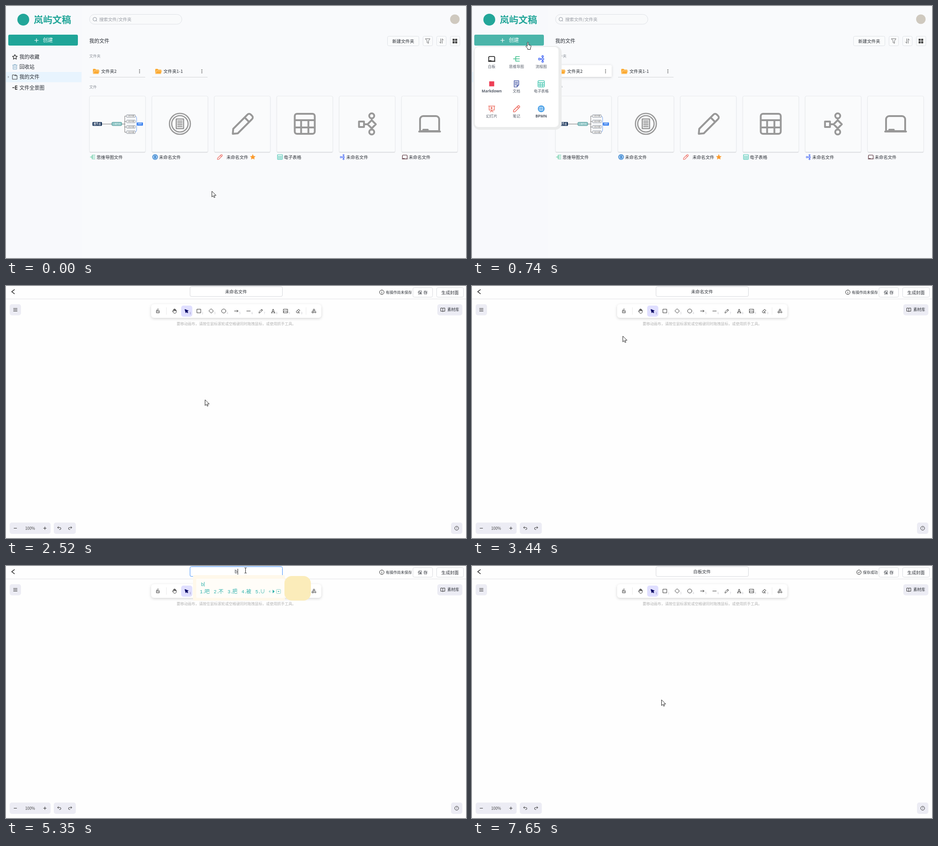
Animation of 1011x554 px, one loop 8000 ms. Source, as an HTML page with a canvas:

```html
<!DOCTYPE html>
<html lang="zh-CN">
<head>
<meta charset="utf-8">
<title>文档工作台</title>
<style>
html, body { margin: 0; width: 100%; height: 100%; overflow: hidden; background: #fff; }
canvas { display: block; width: 100vw; height: 100vh; }
</style>
</head>
<body>
<canvas id="stage" width="1011" height="554"></canvas>
<script>
const ctx = document.getElementById('stage').getContext('2d');
const LOOP = 8000;
const FONT = '"Noto Sans CJK SC", "Noto Sans CJK", "Noto Sans", sans-serif';
const TEAL = '#1fa598', INK = '#2b2f36', GRAY = '#989898', LINE = '#dfe2e7';

// ---------- drawing helpers ----------
function text(s, x, y, size = 9.6, color = INK, align = 'left', weight = 400, font = FONT) {
  ctx.font = `${weight} ${size}px ${font}`;
  ctx.textAlign = align;
  ctx.fillStyle = color;
  ctx.fillText(s, x, y + size * 0.37);
}

function box(x, y, w, h, r, fill, stroke) {
  ctx.beginPath();
  ctx.roundRect(x, y, w, h, r);
  if (fill) { ctx.fillStyle = fill; ctx.fill(); }
  if (stroke) { ctx.strokeStyle = stroke; ctx.lineWidth = 1; ctx.stroke(); }
}

function disc(x, y, r, fill, stroke) {
  ctx.beginPath();
  ctx.arc(x, y, r, 0, 7);
  if (fill) { ctx.fillStyle = fill; ctx.fill(); }
  if (stroke) { ctx.strokeStyle = stroke; ctx.lineWidth = 1; ctx.stroke(); }
}

function shape(d, x, y, scale, stroke, width = 1, fill) {
  const path = new Path2D(d);
  ctx.save();
  ctx.translate(x, y);
  ctx.scale(scale, scale);
  ctx.lineWidth = width / scale;
  ctx.lineCap = ctx.lineJoin = 'round';
  if (fill) { ctx.fillStyle = fill; ctx.fill(path); }
  if (stroke) { ctx.strokeStyle = stroke; ctx.stroke(path); }
  ctx.restore();
}

function shadowed(blur, dy, color, draw) {
  ctx.save();
  ctx.shadowBlur = blur;
  ctx.shadowOffsetY = dy;
  ctx.shadowColor = color;
  draw();
  ctx.restore();
}

// Icons on a 48 unit grid
const ICONS = {
  board: 'M10 7h28a7 7 0 0 1 7 7v26H3V14a7 7 0 0 1 7-7zM1 41h46M10 37h10',
  mind: 'M3 24h16M19 8v32M19 8h26M19 24h26M19 40h26',
  bpmn: 'M47 24a23 23 0 1 1-46 0a23 23 0 1 1 46 0M42 24a18 18 0 1 1-36 0a18 18 0 1 1 36 0' +
        'M16 13.5h16v21H16zM19.5 18h9M19.5 22h9M19.5 26h9M19.5 30h9',
  pencil: 'M3 46l1-11L35 4a5 5 0 0 1 8 0l2 2a5 5 0 0 1 0 8L14 45zM29 10l9 9',
  table: 'M7 2h34a5 5 0 0 1 5 5v34a5 5 0 0 1-5 5H7a5 5 0 0 1-5-5V7a5 5 0 0 1 5-5zM2 16h44M2 32h44M16 16v30M32 16v30',
  flow: 'M6 19h11v12H6zM17 25h8M25 25l9-9 9 9-9 9zM34 16v-4M34 34v3M39.5 6.5a5.5 5.5 0 1 1-11 0a5.5 5.5 0 1 1 11 0' +
        'M39.5 42a5.5 5.5 0 1 1-11 0a5.5 5.5 0 1 1 11 0',
  doc: 'M8 2h32v30L28 46H8zM40 32H28v14M15 13h18M15 22h18M15 31h8',
  slides: 'M2 5h44M6 5v28h36V5M24 33v6M14 46l10-8 10 8M20 13v12l9-6z'
};

function icon(name, cx, cy, size, color, width) {
  shape(ICONS[name], cx - size / 2, cy - size / 2, size / 48, color, width);
}

// ---------- pointer ----------
const TRACK = [
  [0, 452, 407], [100, 452, 407], [740, 122, 79], [1110, 122, 79], [1380, 42, 124],
  [2040, 42, 124], [2680, 463, 258], [2800, 463, 258], [2900, 463, 303], [3140, 463, 303],
  [3440, 331, 110], [3620, 300, 82], [3920, 368, 117], [3950, 368, 117], [4550, 526, 10],
  [7360, 526, 10], [7650, 416, 294], [LOOP, 416, 294]
];

function pointerAt(t) {
  const i = TRACK.findIndex(k => k[0] > t);
  const [t0, x0, y0] = TRACK[i - 1], [t1, x1, y1] = TRACK[i];
  const u = (t - t0) / (t1 - t0), e = u * (2 - u);
  return { x: x0 + (x1 - x0) * e, y: y0 + (y1 - y0) * e };
}

const inside = (p, x, y, w, h) => p.x >= x && p.x <= x + w && p.y >= y && p.y <= y + h;

const POINTERS = {
  arrow: ['M0 0V12.3l2.9-2.7 1.9 4.2 2-.9L5 8.8h3.8z', 0, 0],
  hand: ['M4 8.5V1.3a1.3 1.3 0 0 1 2.6 0V6l4.6 1.2c1 .3 1.2 1 1 2L11 13.5V16H4.8V14L1 9.6c-.6-1 .6-2 1.5-1.3z', -5, 0],
  beam: ['M-2 -6.5h1.5l.5.5.5-.5H2M0-6v10.5M-2 5h1.5l.5-.5.5.5H2', 0, 0]
};

function drawPointer(kind, p) {
  const [d, dx, dy] = POINTERS[kind];
  shape(d, Math.round(p.x + dx) + 0.5, Math.round(p.y + dy) + 0.5, 1, '#222', 1, kind !== 'beam' && '#fff');
}

// ---------- file list page ----------
const FILES = [
  ['mind', '思维导图文件', '#3fc08d'],
  ['bpmn', '未命名文件', '#4f94d8'],
  ['pencil', '未命名文件', '#ee6a5f'],
  ['table', '电子表格', '#4fc9b5'],
  ['flow', '未命名文件', '#4c6ef5'],
  ['board', '未命名文件', '#4a2028']
];
const NEW_FILE = ['board', '未命名文件', '#4a2028'];
const MENU = [
  ['board', '白板', '#111'], ['mind', '思维导图', '#3fc08d'], ['flow', '流程图', '#4c6ef5'],
  [null, 'Markdown', '#ee3f56'], ['doc', '文档', '#5b6bb0'], ['table', '电子表格', '#4fc9b5'],
  ['slides', '幻灯片', '#ee7a6e'], ['pencil', '笔记', '#ee6a5f'], ['bpmn', 'BPMN', '#4fa3e8']
];

function mindThumb(x) {
  shape('M28 61.5h21M72 61.5h6M82 44h-4v35.5h4M78 56h4M78 68h4', x, 198, 1, '#555', 0.8);
  shape('M101 44q3 0 3 5v25q0 5-3 5M104 61.5h2', x, 198, 1, '#4a86e8', 0.8);
  box(x + 7, 255, 21, 8.5, 1.5, '#1f3a5f');
  text('根节点', x + 17.5, 259.3, 5.4, '#fff', 'center', 700);
  box(x + 49.5, 255.5, 22, 7.5, 2, '#8fc7c7', '#5a9a9c');
  text('二级节点', x + 60.5, 259.3, 4, '#fff', 'center');
  for (let i = 0; i < 4; i++) {
    const y = 242 + i * 11.8;
    box(x + 82, y - 3, 19, 6, 1, '#fff', '#8d949e');
    text('分支主题', x + 91.5, y, 3.7, '#444', 'center');
  }
  box(x + 105, 256, 13, 7, 1, '#3b82f0');
  text('概要', x + 111.5, 259.5, 4, '#fff', 'center');
}

function fileCard([name, label, color], i, hot) {
  const x = 183.5 + 137.2 * (i % 6), y = 198 + 157.5 * Math.floor(i / 6);
  const pencil = name === 'pencil';
  shadowed(hot ? 8 : 2, hot ? 2 : 1, hot ? 'rgba(0,0,0,.16)' : 'rgba(0,0,0,.14)',
    () => box(x, y, 123, 123, 3, hot ? '#fff' : '#fafbfc'));
  box(x, y, 123, 123, 3, null, '#e9ebee');
  ctx.fillStyle = '#d3d5d8';
  ctx.fillRect(x + 1, y + 123, 121, 1);
  if (name === 'mind') mindThumb(x - 0.5);
  else icon(name, x + 61.5, y + 61, 48, GRAY, name === 'bpmn' ? 2.6 : 4);
  const off = pencil ? 11 : 0;
  icon(name, x + 7 + off * 0.45, y + 134, 12, color, 1.1);
  text(label, x + 15.5 + off, y + 134);
  if (pencil) {
    shape('M0-5.5L1.7-1.8 5.6-1.5 2.7 1.2 3.5 5 0 3-3.5 5-2.7 1.2-5.6-1.5-1.7-1.8z',
      x + 84.5, y + 134, 1, '#fb9a2c', 0.6, '#fb9a2c');
  }
}

function folder(x, label, hot) {
  if (hot) shadowed(6, 1, 'rgba(0,0,0,.14)', () => box(x, 130, 124, 26.5, 3, '#fff'));
  ctx.fillStyle = '#d3d5d8';
  ctx.fillRect(x + 1, 156, 122, 1);
  shape('M0 11V1.5Q0 0 1.5 0h4l1.5 1.8h5.5q1.5 0 1.5 1.5V4h1.5L13 11.5H.5z', x + 8, 138.3, 0.97, null, 1, '#fba930');
  shape('M3.2 4.3h11.5L12.7 11H1z', x + 8, 138.3, 0.97, '#fff', 0.6);
  text(label, x + 26, 143.5);
  for (let i = -1; i < 2; i++) disc(x + 110.5, 143.5 + i * 3.3, 0.95, '#444');
}

function sidebar() {
  ctx.fillStyle = '#f8f9fc';
  ctx.fillRect(0, 0, 167, 554);
  disc(38, 30, 13, '#22a699');
  text('岚屿文稿', 61, 30, 20.5, '#22a699', 'left', 700);
  ctx.fillStyle = '#e8f4fe';
  ctx.fillRect(0, 145, 166, 22.5);
  shape('M0-2.5L3 0 0 2.5z', 4, 156, 1, null, 1, '#a9adb4');
  shape('M0-5.3L1.6-1.8 5.3-1.4 2.6 1.2 3.3 5 0 3.1-3.3 5-2.6 1.2-5.3-1.4-1.6-1.8z', 19.5, 112, 1, '#222', 1.2);
  shape('M-5-3.7H5M-2-5.2h4M-4-3.7V5.3h8V-3.7M-1.5-1.5v4.5M1.5-1.5v4.5', 19.5, 133.7, 1, '#7fa9c4', 1);
  shape('M-5-4.5h3.5L0-2.8h4.8V5H-5zM0-2.8V-4.5h2.5L4.8-2.5', 19.5, 156, 1, '#333', 1);
  shape('M-5 0h3.5M1 0h4M1-3.7h4M1 3.7h4M1-3.7v7.4', 19.5, 179.5, 1, '#222', 1.4);
  ['我的收藏', '回收站', '我的文件', '文件全景图'].forEach((s, i) =>
    text(s, 29.5, [112, 134, 156, 179.5][i], 11));
}

function topBar() {
  box(183.5, 18.5, 203, 21.5, 11, '#f9fafb', LINE);
  disc(195.2, 29, 4, null, '#8d949e');
  shape('M0 0l1.5 1.5', 198, 32, 1, '#8d949e');
  text('搜索文件/文件夹', 205, 29, 9.6, '#979ba3');
  disc(986.5, 29, 10.5, '#cfc9bf');
  text('我的文件', 183, 77, 11);
  box(838.5, 66.5, 69, 21, 3, '#fafbfc', LINE);
  text('新建文件夹', 873, 77, 9.6, INK, 'center');
  for (const x of [916.5, 946.5, 976.5]) box(x, 66.5, 21, 21, 3, '#fafbfc', LINE);
  shape('M-5-5H5L1.6-.3V5l-3.2-1.6V-.3z', 927, 77, 1, '#555', 0.9);
  shape('M-1.5-5V5L-4.5 2M1.8 5V-5L4.5-2', 957, 77, 1, '#555', 0.9);
  for (let i = 0; i < 4; i++) box(981.5 + (i % 2) * 5.6, 72 + (i >> 1) * 5.6, 4.6, 4.6, 0.8, '#444');
  text('文件夹', 183, 110, 8.3, '#8f949c');
  text('文件', 183, 177.5, 8.3, '#8f949c');
}

function createMenu(alpha, hot) {
  ctx.globalAlpha = alpha;
  box(3, 88, 194, 184, 14, '#ebecec');
  box(6, 90, 184, 176, 8, '#fff');
  if (hot) box(19.5, 100.5, 48, 44, 4, '#f2f5fb');
  MENU.forEach(([name, label, color], i) => {
    const x = 43.3 + (i % 3) * 54.4, y = 116.3 + Math.floor(i / 3) * 54.8;
    if (name === 'bpmn') {
      disc(x, y, 7.5, color);
      shape('M-3.5-3.5h7v7h-7zM-1.5-3.5v7M1.5-3.5v7', x, y, 1, '#fff', 0.8);
    } else if (name) icon(name, x, y, 15, color, 1.6);
    else box(x - 5.5, y - 5.5, 11, 11, 0, color);
    text(label, x, y + 16.3, 8.2, '#555c68', 'center', /[A-Z]/.test(label) ? 700 : 500,
      /[A-Z]/.test(label) ? '"Noto Sans", sans-serif' : FONT);
  });
  ctx.globalAlpha = 1;
}

function homePage(t, p) {
  ctx.fillStyle = '#f9fafc';
  ctx.fillRect(0, 0, 1011, 554);
  sidebar();
  topBar();
  const onButton = inside(p, 5, 63, 153, 24);
  const menu = Math.min(1, Math.max(0, (t - 610) / 100));
  const onItem = menu === 1 && inside(p, 20, 101, 48, 44);
  const onFolder = inside(p, 183, 130, 124, 27);
  const files = t < 1720 ? FILES : [NEW_FILE, ...FILES];
  let onCard = false;

  folder(183, '文件夹2', onFolder || (t > 560 && t < 1380));
  folder(320, '文件夹1-1');
  files.forEach((f, i) => {
    const hot = i < 6 && inside(p, 183 + 137.2 * i, 198, 124, 124);
    onCard = onCard || hot;
    fileCard(f, i, hot);
  });
  box(5, 63, 153, 24, 3, onButton ? '#4bb5aa' : TEAL);
  shape('M-4 0H4M0-4V4', 67, 75.5, 1, '#fff', 1.2);
  text('创建', 81, 75.3, 11, '#fff');
  if (menu) createMenu(menu, onItem);
  drawPointer(onButton || onItem || onFolder || onCard ? 'hand' : 'arrow', p);
}

// ---------- whiteboard page ----------
const TOOLS = [
  [334, 'M-3-.5h6v4.5h-6zM-2-.5V-2.5a2 2 0 0 1 3.8-.8M0 1.2v1'],
  [370, 'M-2 .5V-3a.8.8 0 0 1 1.6 0V-.5-4a.8.8 0 0 1 1.6 0V-.5-3.2a.8.8 0 0 1 1.6 0V0-1.5a.8.8 0 0 1 1.5 0V1.5C4.3 6-1 6-2.3 3L-4.3.3c0-1.3 1.3-1.2 2.3.2'],
  [397, 'M-3.5-3.5L3.8-.6.9.7 3 3.5 1.8 4.2 0 1.6-1.5 3.8z'],
  [424, 'M-4-4H4V4H-4z'],
  [451, 'M0-4.8L4.8 0 0 4.8-4.8 0z'],
  [478.5, 'M4.7 0a4.7 4.4 0 1 1-9.4 0a4.7 4.4 0 1 1 9.4 0'],
  [506, 'M-4 0H4M1.5-2.2L4 0 1.5 2.2'],
  [533, 'M-4 0H4'],
  [560, 'M-4 4l.6-2.6L2-4l2 2-5.4 5.4zM.7-2.6l2 2'],
  [587, 'M-4 4h2.5M1 4h3.5M-2.8 4L-.4-4H.6L3 4M-2 1.2h4'],
  [614.5, 'M-4.5-4h9V4h-9zM-4.5 2L-1.5-.8 1 1.5 2.3.5 4.5 2.3M2-1.8h.3'],
  [642, 'M-4 1L1-4l3 2.8L-.8 4h-1.5zM-1.7-1.3L1.4 1.7M0 4h3.5'],
  [677, 'M0-4.5L2.3-1h-4.6zM-4 1h3v3h-3zM4.2 2.5a1.6 1.6 0 1 1-3.2 0a1.6 1.6 0 1 1 3.2 0']
];

function board() {
  const pad = '#ececf4';
  shadowed(6, 2, 'rgba(0,0,0,.16)', () => box(319, 40, 374, 30, 6, '#fff'));
  box(385, 43, 24.5, 24.5, 5, '#e0dfff');
  ctx.fillStyle = '#ebebeb';
  ctx.fillRect(352, 47, 1, 16);
  ctx.fillRect(659, 47, 1, 16);
  TOOLS.forEach(([x, d], i) => {
    const active = i === 2;
    shape(d, x, 55, 1, active ? '#030064' : '#333', 1, active && '#030064');
    if (i > 1 && i < 12) text(String((i - 1) % 10), x + 8, 60, 5.5, active ? '#6b68a8' : '#b9b9c0', 'center');
  });
  text('要移动画布，请按住鼠标滚轮或空格键同时拖拽鼠标，或使用抓手工具。', 375, 83, 8.2, '#b3b3b3');

  box(8, 40, 25, 24.5, 5, pad);
  shape('M-4-3H4M-4 0H4M-4 3H4', 20.5, 52.3, 1, '#333');
  box(948, 40, 55, 24.5, 5, pad);
  shape('M0-3Q-2-4-4.5-3.5V3.5Q-2 3 0 4 2 3 4.5 3.5V-3.5Q2-4 0-3V4', 960, 52, 1, '#333', 1);
  text('素材库', 970, 52.3, 8.6);

  box(8, 520, 90, 25, 5, pad);
  shape('M-3 0H3', 20.5, 532.5, 1, '#333');
  shape('M-3 0H3M0-3V3', 85.5, 532.5, 1, '#333');
  text('100%', 53, 532.5, 8.4, '#444', 'center');
  box(105, 520, 48.5, 25, 5, pad);
  const undo = 'M-1.5-3.5L-3.7-1.5-1.5.5M-3.7-1.5H1.5a2.2 2.2 0 0 1 0 4.4H.5';
  shape(undo, 117, 532.5, 1, '#333');
  shape(undo.replace(/.*/, 'M1.5-3.5L3.7-1.5 1.5.5M3.7-1.5H-1.5a2.2 2.2 0 0 0 0 4.4H-.5'), 141, 532.5, 1, '#333');
  box(978, 520, 25, 25, 5, pad);
  disc(990.5, 532.5, 4.3, null, '#333');
  text('?', 990.5, 532.5, 6.5, '#333', 'center', 500);
}

// time, committed text, pinyin, candidates, panel left, panel right
const TYPING = [
  [5350, '', 'b', '吧 不 把 被 ∪', 410, 670],
  [5530, '', 'ba', '吧 把 爸 八 罢', 410, 670],
  [5610, '', 'bai', '白 百 拜 败 摆', 410, 670],
  [5690, '', "bai'b", '白班 百倍 百变 白白 摆布', 410, 740],
  [5770, '', "bai'ban", '白板 百般 摆版 白班 白', 410, 725],
  [6080, '白板', ''],
  [6540, '白板', 'w', '我 为 完 未 问', 439.5, 699],
  [6610, '白板', "w'j", '文件 玩家 危机 忘记 无', 439.5, 753],
  [6680, '白板文件', '']
];

function inputPanel(pinyin, words, left, right) {
  const teal = '#2fb1ac', edge = right - 58;
  box(left + 1, 20, edge - left, 56, 3, '#fff8ea');
  box(left + 8, 28, edge - left - 8, 42, 2, '#fffdf8');
  text(pinyin, left + 18.5, 40, 10.5, teal, 'left', 500, '"Liberation Mono", monospace');
  ctx.fillRect(left + 19 + ctx.measureText(pinyin).width, 35, 1, 10);
  let x = left + 16;
  words.split(' ').forEach((w, i) => {
    text(`${i + 1}.`, x, 56, 10.5, teal, 'left', 400, '"Liberation Mono", monospace');
    text(w, x + 10.5, 56, 11, teal);
    x += 19.5 + 11 * w.length;
  });
  shape('M0-3V3L-4 0z', right - 89, 56, 1, null, 1, '#a9dcd9');
  shape('M0-4V4L4.5 0z', right - 84, 56, 1, null, 1, teal);
  box(right - 75.5, 51.5, 9, 9, 1, null, '#8fd2cf');
  shape('M-2-1H2L0 1.5z', right - 71, 56, 1, null, 1, teal);
  box(edge, 22, 58, 54, 16, '#fbecba');
}

function header(t) {
  ctx.fillStyle = '#e3e4e6';
  ctx.fillRect(0, 28, 1011, 1);
  shape('M3-4.5L-3 0 3 4.5', 15.5, 12.5, 1, '#111', 1.4);

  const focus = t >= 4480 && t < 7400;
  box(404.5, 1.5, 203, 21.5, 3, '#fff', focus ? '#3f8ffb' : '#d6d8dc');
  const now = TYPING.findLast(k => k[0] <= t);
  const title = now ? now[1] + now[2] : '未命名文件';
  ctx.font = `400 9.6px ${FONT}`;
  const w = ctx.measureText(title).width;
  const selected = t >= 4650 && !now;
  if (selected) {
    ctx.fillStyle = '#1677ff';
    ctx.fillRect(505.5 - w / 2, 5, w, 14);
  }
  text(title, 505.5, 12.2, 9.6, selected ? '#fff' : INK, 'center');
  if (focus && !selected && t < 7090) {
    ctx.fillStyle = '#222';
    ctx.fillRect(Math.round(506 + w / 2), 6, 1, 13);
  }

  const saved = t >= 7150;
  const sx = saved ? 850.5 : 826;
  disc(sx, 13.7, 4.9, null, '#222');
  shape(saved ? 'M-2.2 0L-.5 1.8 2.4-1.7' : 'M0-2.3V-2.2M0-.3V2.5', sx, 13.7, 1, '#222', 1);
  text(saved ? '保存成功' : '有操作尚未保存', sx + 8.8, 13.9, 8.2);
  box(894.5, 3.5, 43, 21, 3, '#fff', '#d9dbdf');
  text('保', 905, 14, 9.6);
  text('存', 917.3, 14, 9.6);
  box(946.5, 3.5, 59, 21, 3, '#fff', '#d9dbdf');
  text('生成封面', 976, 14, 9.6, INK, 'center');
  return now;
}

function editorPage(t, p) {
  ctx.fillStyle = '#fefefe';
  ctx.fillRect(0, 0, 1011, 554);
  if (t >= 2250) board();
  const now = header(t);
  if (now && now[2]) inputPanel(...now.slice(2));
  drawPointer(inside(p, 404, 1, 204, 22) ? 'beam' : 'arrow', p);
}

// ---------- loop ----------
const start = performance.now();

function frame() {
  const t = (performance.now() - start) % LOOP;
  (t < 2040 ? homePage : editorPage)(t, pointerAt(t));
  requestAnimationFrame(frame);
}
frame();
</script>
</body>
</html>
```
